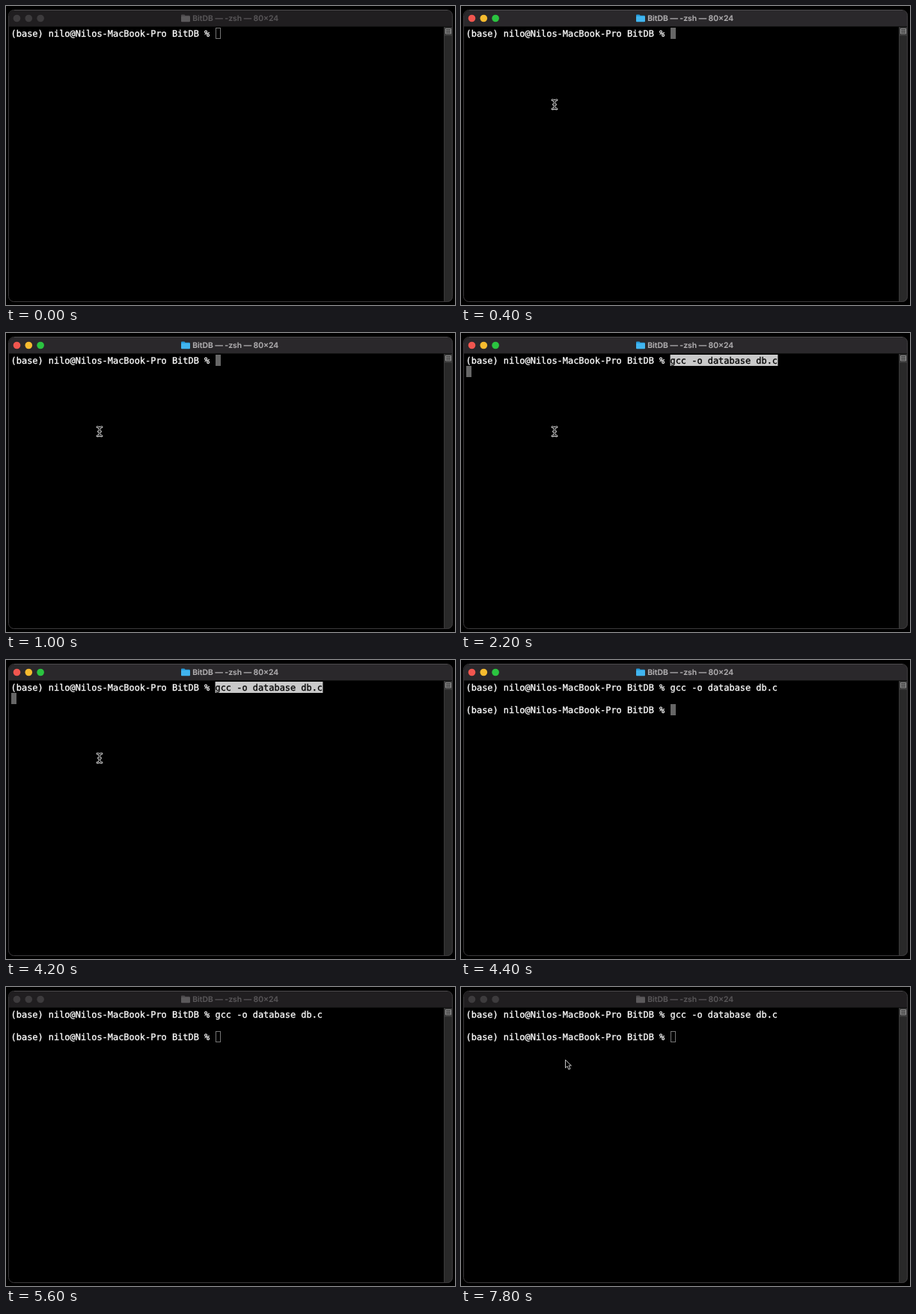
Recreate the animation shown at these times as an HTML page. Size 600x400 px, loop 8000 ms.

```html
<!DOCTYPE html>
<html lang="en">
<head>
<meta charset="utf-8">
<title>Terminal</title>
<style>
  html, body { margin: 0; width: 100%; height: 100%; overflow: hidden; background: #000; }
  svg { display: block; width: 600px; height: 400px; }
  text { text-rendering: geometricPrecision; white-space: pre; }
  .mono { font: 11.93px "DejaVu Sans Mono", monospace; fill: #fff; stroke: #fff; stroke-width: .3px; }
  .title { font: 600 10.35px Inter, sans-serif; fill: #aeacae; stroke: #aeacae; stroke-width: .15px; }
  .bar { fill: #2a282b; }
  .folder { fill: #41b5ef; }
  .flap { fill: #249bdb; }
  .red { fill: #f1564f; }
  .yellow { fill: #f6bb2f; }
  .green { fill: #2bc440; }
  .block { fill: #666; }
  .icon { fill: none; stroke: #989898; stroke-width: .9; }
  .idle .bar { fill: #201e20; }
  .idle .title { fill: #575557; stroke: #575557; }
  .idle .folder { fill: #5b595b; }
  .idle .flap { fill: #4c4a4c; }
  .idle .light { fill: #3d3b3d; }
  .idle .block { fill: none; stroke: #747474; }
  .selected { fill: #000; stroke: #000; }
</style>
</head>
<body>
<svg id="stage" viewBox="0 0 600 400">
  <rect width="600" height="400"/>
  <path class="bar" d="M4 28V13a7 7 0 0 1 7-7H590a7 7 0 0 1 7 7V28Z"/>
  <path d="M4 27.5H597" stroke="#111"/>
  <path d="M585 28H597V389a7 7 0 0 1-7 7H585Z" fill="#292929"/>
  <path d="M585.5 28V396" stroke="#383838"/>
  <rect x="586" y="29" width="10" height="11" fill="#3a3a3a"/>
  <path class="icon" d="M587.5 30.5h7v6.5h-7ZM588 32.7h6M588 34.9h6"/>
  <rect x="3.5" y="5.5" width="593" height="390" rx="7" fill="none" stroke="#3c3a3c"/>
  <path d="M11 5.5H590" stroke="#4c4a4c"/>

  <circle class="light red" cx="14.5" cy="16.5" r="4.8"/>
  <circle class="light yellow" cx="30.3" cy="16.5" r="4.8"/>
  <circle class="light green" cx="46.1" cy="16.5" r="4.8"/>
  <path class="flap" d="M234 20V12.5q0-1 1-1h3.4l1.3 1.2h5.2q1 0 1 1V20Z"/>
  <rect class="folder" x="234" y="13.8" width="12" height="7.4" rx="1"/>
  <text class="title" x="249.3" y="20.2">BitDB — -zsh — 80×24</text>

  <rect id="highlight" x="279.6" y="29" width="143.8" height="15" fill="#c9c9c9"/>
  <text class="mono" x="6.6" y="41" xml:space="preserve">(base) nilo@Nilos-MacBook-Pro BitDB % </text>
  <text class="mono" id="command" x="279.5" y="41">gcc -o database db.c</text>
  <text class="mono" id="prompt" x="6.6" y="71" xml:space="preserve">(base) nilo@Nilos-MacBook-Pro BitDB % </text>
  <rect class="block" id="block"/>

  <path id="arrow" d="M.5 .5V11.2L3 8.9L4.9 13.3L7 12.4L5.1 8.1H8.4Z" fill="#000" stroke="#d8d8d8" stroke-width=".9" stroke-linejoin="round"/>
  <g id="beam" fill="none" stroke-linecap="round" stroke-linejoin="round">
    <use href="#beamShape" stroke="#e6e6e6" stroke-width="2.8"/>
    <use href="#beamShape" stroke="#000" stroke-width="1.1"/>
  </g>
  <defs>
    <path id="beamShape" d="M-3-6Q0-6 0-3.5Q0-6 3-6M-3 6Q0 6 0 3.5Q0 6 3 6M0-3.5V3.5M-1.5 0H1.5"/>
  </defs>
</svg>
<script>
const LOOP = 8000;
const LINE = 15;
const $ = id => document.getElementById(id);

// Each step changes only the listed properties.
const steps = [
  { at: 0, active: false, typed: false, selected: false, done: false, col: 38, row: 0, arrow: null, beam: null },
  { at: 200, arrow: [115, 127] },
  { at: 400, active: true, arrow: null, beam: [125, 131.8] },
  { at: 2200, typed: true, selected: true, col: 0, row: 1 },
  { at: 2400, beam: [125, 131.3] },
  { at: 4400, selected: false, done: true, col: 38, row: 2, beam: null },
  { at: 5600, active: false },
  { at: 7800, arrow: [139, 97] }
];

const show = (id, on) => { $(id).style.display = on ? "" : "none"; };

function place(id, point) {
  show(id, point);
  if (point) $(id).setAttribute("transform", `translate(${point})`);
}

function render(time) {
  const s = Object.assign({}, ...steps.filter(step => step.at <= time));
  $("stage").classList.toggle("idle", !s.active);
  $("command").classList.toggle("selected", s.selected);
  show("command", s.typed);
  show("highlight", s.selected);
  show("prompt", s.done);
  place("arrow", s.arrow);
  place("beam", s.beam);

  // The idle caret is an outline, so its edges sit on half pixels.
  const inset = s.active ? 0 : 0.5;
  const box = {
    x: Math.round(7 + s.col * 7.18) + inset,
    y: 29 + s.row * LINE + inset,
    width: 7 - inset * 2,
    height: LINE - inset * 2
  };
  for (const key in box) $("block").setAttribute(key, box[key]);
}

const start = performance.now();
function tick() {
  render((performance.now() - start) % LOOP);
  requestAnimationFrame(tick);
}
tick();
</script>
</body>
</html>
```
